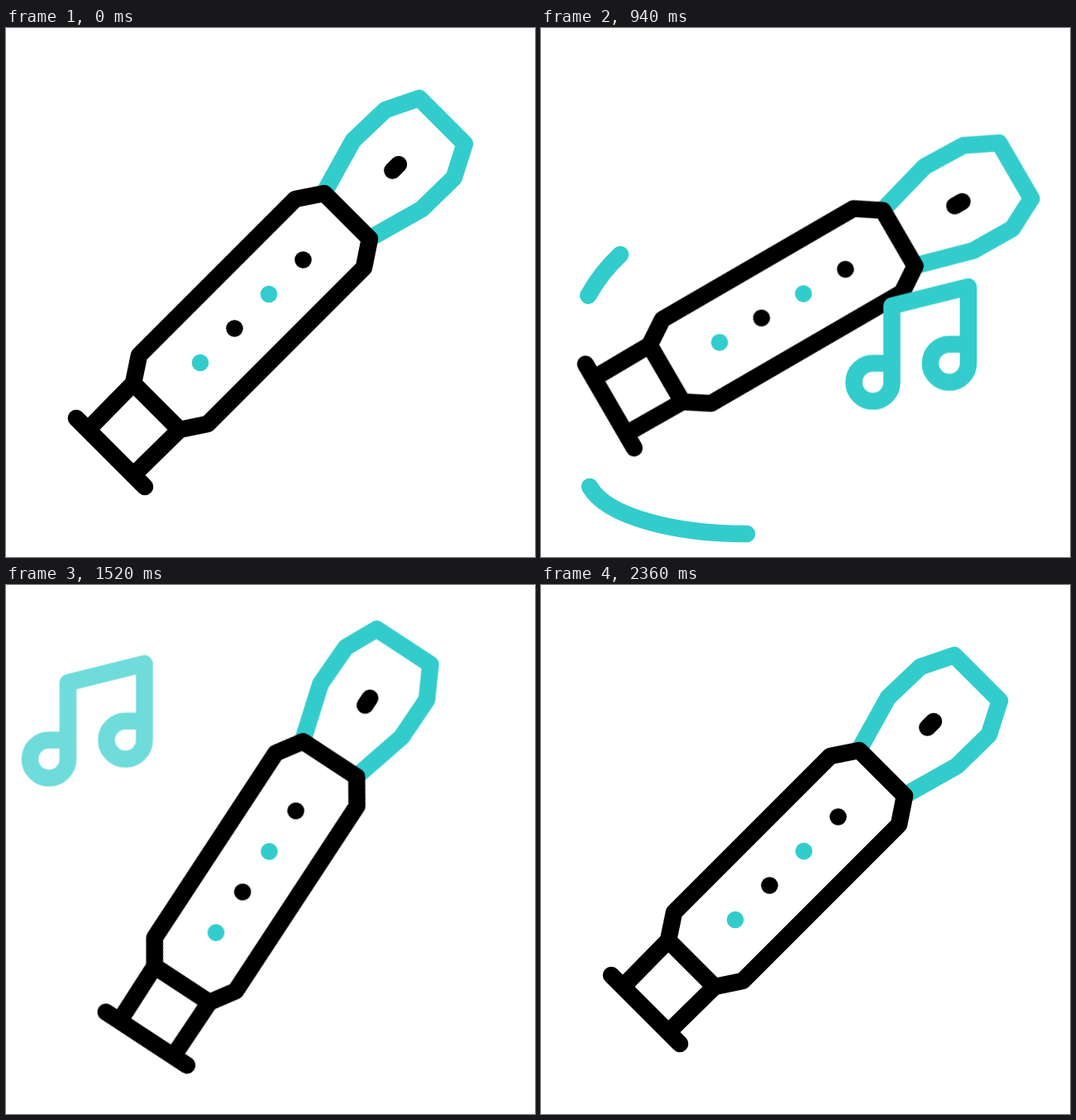
An HTML page that plays this animation: 640x640 px, repeating every 2400 ms.

```html
<!DOCTYPE html>
<html lang="en">
<head>
<meta charset="utf-8">
<title>Flute</title>
<style>
  html, body { margin: 0; width: 100%; height: 100%; overflow: hidden; background: #fff; }
  svg { display: block; width: 100%; height: 100%; }

  .line { fill: none; stroke: #000; stroke-width: 20.6; stroke-linecap: round; stroke-linejoin: round; }
  .teal { stroke: #3cc; }
  .dots { stroke: none; fill: #000; }
  .dots .alt { fill: #3cc; }

  .flute, .note, .trail { animation: 2400ms linear infinite; }
  .flute { transform-origin: 320px 320px; animation-name: swing; animation-timing-function: cubic-bezier(.333, 0, .667, 1); }
  .right { animation-name: rise-right; }
  .left { animation-name: rise-left; }
  .upper { animation-name: sweep-up; }
  .lower { animation-name: sweep-down; }

  @keyframes swing {
    0%, 98.33%, 100% { transform: rotate(0deg); }
    32.7% { transform: rotate(18deg); }
    65.2% { transform: rotate(-12deg); }
  }
  @keyframes rise-right {
    0%, 22.5% { transform: translate(0, 169px); opacity: 0; }
    29.17% { transform: translate(0, 101.4px); opacity: 1; }
    41.67% { transform: translate(0, -25.4px); opacity: 1; }
    47.5%, 100% { transform: translate(0, -84.4px); opacity: 0; }
  }
  @keyframes rise-left {
    0%, 42.5% { transform: translate(-349.5px, 7px); opacity: 0; }
    49.17% { transform: translate(-349.5px, -65px); opacity: 1; }
    61.67% { transform: translate(-349.5px, -200px); opacity: 1; }
    67.5%, 100% { transform: translate(-349.5px, -263px); opacity: 0; }
  }
  /* dash length is the visible part, offset is the tail */
  @keyframes sweep-up {
    0%, 20.83% { stroke-dasharray: 0 999; stroke-dashoffset: 0; opacity: 0; }
    20.84% { opacity: 1; }
    22.5% { stroke-dasharray: 35 999; stroke-dashoffset: 0; }
    27.5% { stroke-dasharray: 143 999; stroke-dashoffset: 0; }
    32.5% { stroke-dasharray: 163 999; stroke-dashoffset: -45; }
    39.17% { stroke-dasharray: 66 999; stroke-dashoffset: -143; }
    44.16% { opacity: 1; }
    44.17%, 100% { stroke-dasharray: 0 999; stroke-dashoffset: -208; opacity: 0; }
  }
  @keyframes sweep-down {
    0%, 23.33% { stroke-dasharray: 0 999; stroke-dashoffset: 0; opacity: 0; }
    23.34% { opacity: 1; }
    27.5% { stroke-dasharray: 71 999; stroke-dashoffset: 0; }
    39.17% { stroke-dasharray: 205 999; stroke-dashoffset: -70; }
    46.25% { stroke-dasharray: 170 999; stroke-dashoffset: -230; }
    50.82% { opacity: 1; }
    50.83%, 100% { stroke-dasharray: 0 999; stroke-dashoffset: -400; opacity: 0; }
  }
</style>
</head>
<body>
<svg viewBox="0 0 640 640">
  <defs>
    <path id="note" d="M424.5 406H401.5a23 23 0 1 0 23 23V336.5L517 313.5V406a23 23 0 1 1-23-23H517"/>
  </defs>

  <path class="line teal trail upper" d="M56 449C15 434 22 380 57 324C68 304 81 288 96 274"/>
  <path class="line teal trail lower" d="M61 488C52 505 42 530 59 555C80 592 165 612 248 612C290 612 330 617 372 624"/>

  <g class="line flute">
    <path class="teal" d="M385 199L420 136L459 99L500 85L555 140L542 181L503 219L441 254"/>
    <path d="M385 200L440 255L433 290L244 479L210 486L154 430L161 396L350 207Z"/>
    <path d="M154 430L99 486M210 486L154 541M85 472L168 555"/>
    <path d="M467.5 172.5L475 165"/>
    <g class="dots">
      <circle cx="359.5" cy="280.5" r="10.3"/>
      <circle class="alt" cx="318" cy="322" r="10.3"/>
      <circle cx="276.5" cy="363.5" r="10.3"/>
      <circle class="alt" cx="235" cy="405" r="10.3"/>
    </g>
  </g>

  <g class="line teal note right"><use href="#note"/></g>
  <g class="line teal note left"><use href="#note"/></g>
</svg>
</body>
</html>
```
